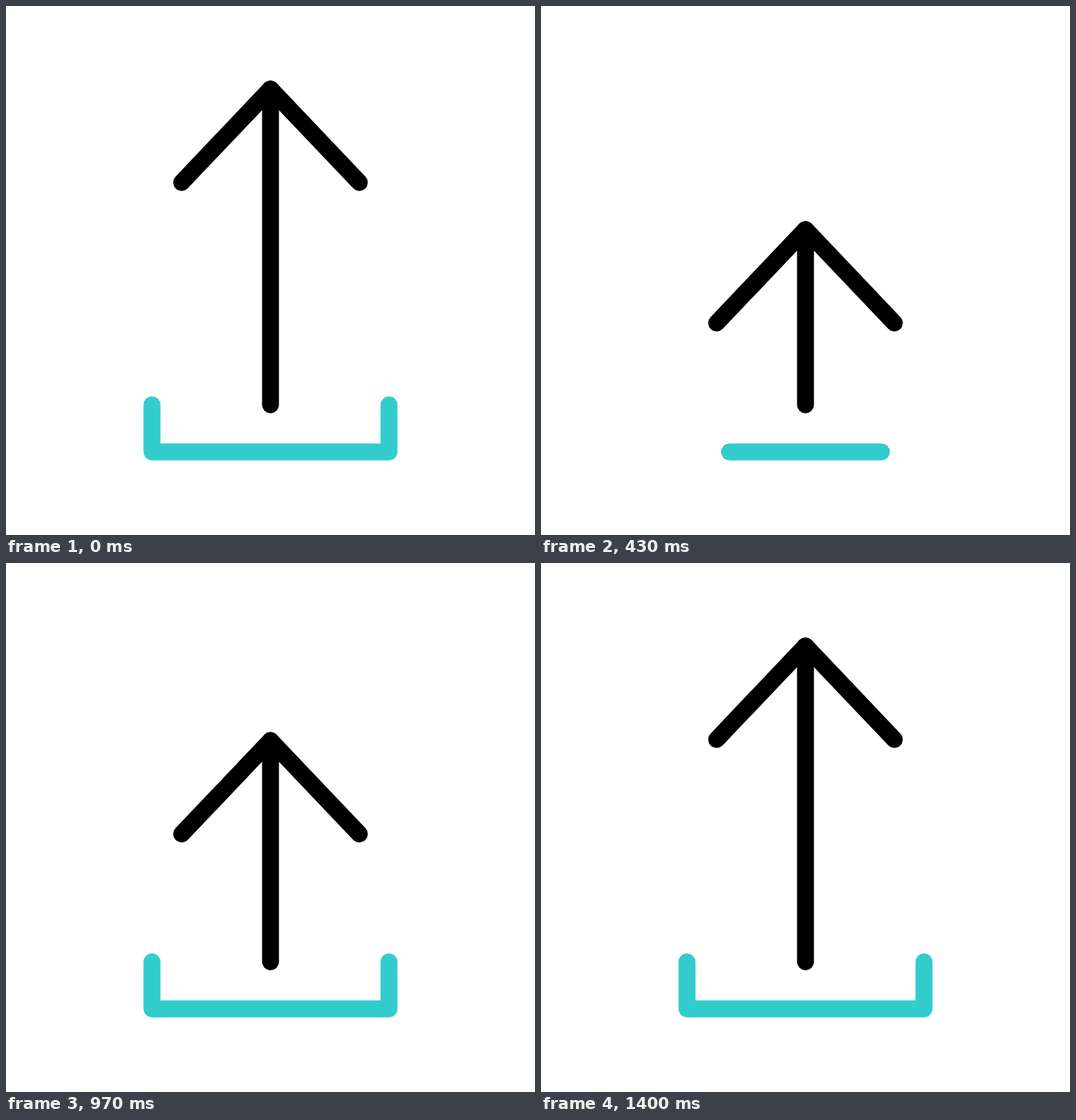
An HTML page that plays this animation: 640 px wide and 640 px high, repeating every 2 s.

```html
<!DOCTYPE html>
<html lang="en">
<head>
<meta charset="utf-8">
<title>Upload arrow</title>
<style>
  html, body { margin: 0; width: 100%; height: 100%; overflow: hidden; background: #fff; }
  svg { display: block; width: 100%; height: 100%; }
  path { fill: none; stroke-width: 20.5; stroke-linecap: round; stroke-linejoin: round; }
</style>
</head>
<body>
<svg viewBox="0 0 640 640">
  <path id="tray" stroke="#33cccc"/>
  <path id="shaft" stroke="#000"/>
  <path id="head" stroke="#000" d="M212.5 213.5L320 100.4L427.5 213.5"/>
</svg>
<script>
const LOOP = 2000;
const TURN = 14;
const TRAY = { left: 176.6, right: 463.4, top: 482.5, bottom: 539.5, trim: 110.2 };
const TIP = 100.4;

// Arrow offset keys: step, offset, outgoing ease handle
const KEYS = [
  [0, 0, 0.43], [TURN, 172.6], [25.3, 0], [29.2, 115.3],
  [33.5, 0], [38, 77.2], [42, 0]
];

const [tray, shaft, head] = ["tray", "shaft", "head"].map(id => document.getElementById(id));

// Flat-ended cubic ease with horizontal handles a and b
function ease(x, a = 1 / 3, b = 2 / 3) {
  if (x <= 0) return 0;
  if (x >= 1) return 1;
  let lo = 0, hi = 1;
  for (let i = 0; i < 24; i++) {
    const t = (lo + hi) / 2, u = 1 - t;
    if (3 * u * u * t * a + 3 * u * t * t * b + t * t * t < x) lo = t;
    else hi = t;
  }
  return lo * lo * (3 - 2 * lo);
}

function arrowOffset(step) {
  for (let i = 1; i < KEYS.length; i++) {
    const [s0, y0, a] = KEYS[i - 1], [s1, y1] = KEYS[i];
    if (step < s1) return y0 + (y1 - y0) * ease((step - s0) / (s1 - s0), a);
  }
  return 0;
}

function trayPath(step) {
  const { left, right, top, bottom, trim } = TRAY;
  const cut = trim * ease(1 - Math.abs(step - TURN) / TURN, 0.45);
  const side = bottom - top;
  if (cut < side) {
    return `M${left} ${top + cut}V${bottom}H${right}V${top + cut}`;
  }
  const inset = cut - side;
  return `M${left + inset} ${bottom}H${right - inset}`;
}

// Thirty steps a second, on a 10 ms clock
function stepAt(ms) {
  const rest = ms % 100;
  return Math.floor(ms / 100) * 3 + (rest >= 70 ? 2 : rest >= 30 ? 1 : 0);
}

function draw(ms) {
  const step = stepAt(ms % LOOP);
  const y = arrowOffset(step);
  tray.setAttribute("d", trayPath(step));
  shaft.setAttribute("d", `M320 482.5V${TIP + y}`);
  head.setAttribute("transform", `translate(0 ${y})`);
}

let start;
function tick(now) {
  if (start === undefined) start = now;
  draw(Math.max(0, now - start));
  requestAnimationFrame(tick);
}
draw(0);
requestAnimationFrame(tick);
</script>
</body>
</html>
```
